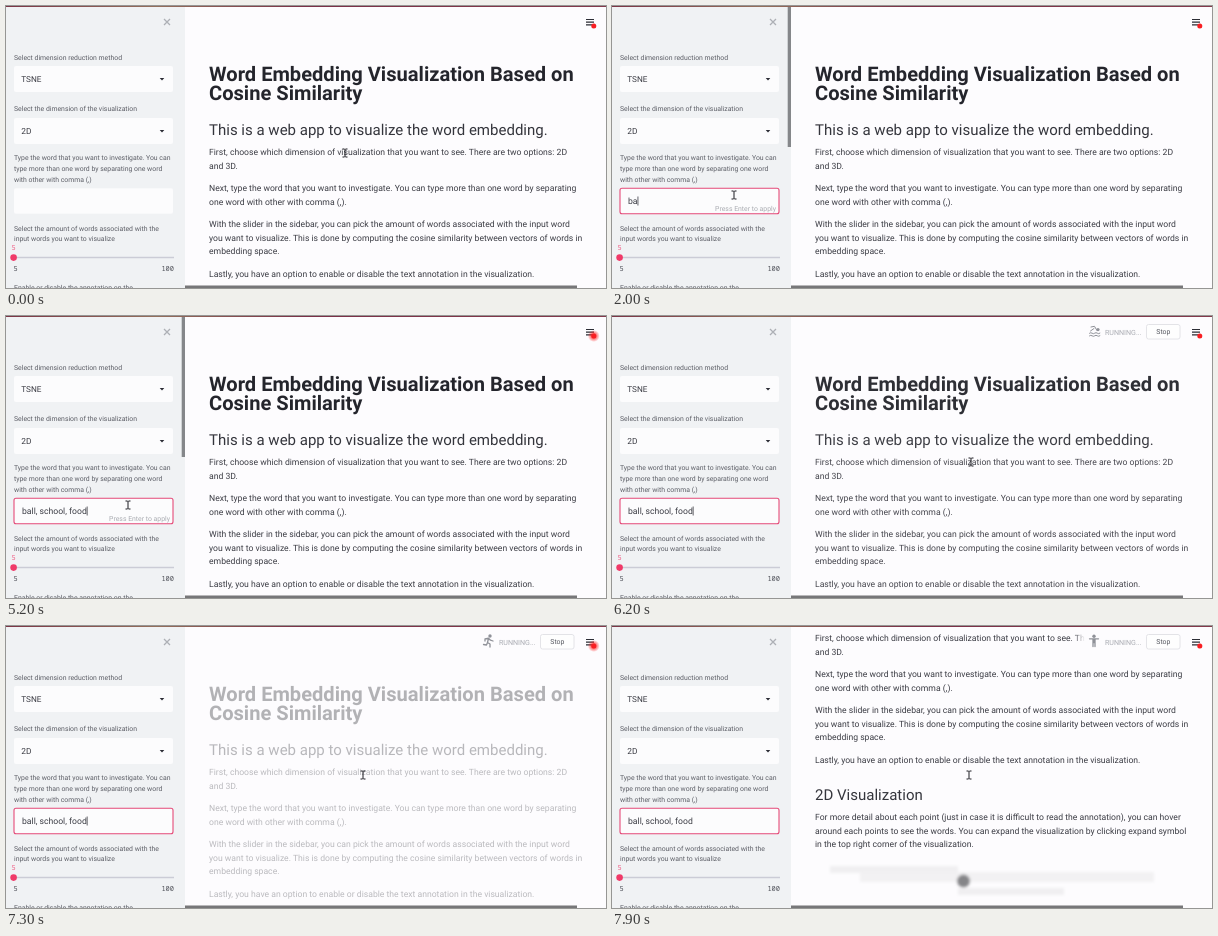
An HTML page that plays this animation: 600x282 px, repeating every 8 s.

```html
<!DOCTYPE html>
<html lang="en">
<head>
<meta charset="utf-8">
<title>Word embedding app</title>
<style>
  html, body { margin: 0; width: 100%; height: 100%; overflow: hidden; background: #fdfcfe; }
  svg { display: block; width: 600px; height: 282px; }
  text { font: 8.63px Roboto, sans-serif; fill: #3b3c44; white-space: pre; text-rendering: geometricPrecision; }
  .h1 { font-size: 20.1px; font-weight: 700; fill: #24252c; }
  .h2 { font-size: 15.02px; fill: #34353c; }
  .label { font-size: 6.87px; fill: #5c5e66; }
  .mono { font: 7px "Noto Sans Mono", monospace; fill: #4c4e56; }
  .line { fill: none; stroke: #8f9198; stroke-width: 1.3; stroke-linecap: round; stroke-linejoin: round; }
  .line circle { fill: #8f9198; stroke: none; }
</style>
</head>
<body>
<svg viewBox="0 0 600 282">
  <defs>
    <linearGradient id="strip">
      <stop offset="0" stop-color="#7c3546"/>
      <stop offset=".25" stop-color="#94705c"/>
      <stop offset=".5" stop-color="#7b3047"/>
      <stop offset="1" stop-color="#843a4c"/>
    </linearGradient>
    <linearGradient id="veil">
      <stop offset="0" stop-color="#fdfcfe" stop-opacity="0"/>
      <stop offset=".08" stop-color="#fdfcfe"/>
    </linearGradient>
    <radialGradient id="glow">
      <stop offset=".3" stop-color="#ff2020" stop-opacity=".8"/>
      <stop offset="1" stop-color="#ff2020" stop-opacity="0"/>
    </radialGradient>
    <filter id="soft" x="-20%" y="-50%" width="140%" height="200%"><feGaussianBlur stdDeviation="1.6"/></filter>
  </defs>

  <rect width="600" height="282" fill="#fdfcfe"/>
  <g id="page">
    <g id="intro"></g>
    <g id="result">
      <g id="resultText"></g>
      <g filter="url(#soft)">
        <rect x="218" y="374" width="128" height="7" fill="#f0eff1"/>
        <rect x="248" y="380" width="294" height="10" fill="#f2f1f3"/>
        <rect x="346" y="396" width="106" height="7" fill="#f0eff1"/>
        <circle cx="351.5" cy="389" r="6.5" fill="#858588"/>
      </g>
    </g>
  </g>

  <g id="status">
    <rect x="462" y="2" width="138" height="28" fill="url(#veil)"/>
    <g class="line" id="icons">
      <g stroke-width="1"><circle cx="486" cy="13.6" r="1.6"/><path d="M479 11l3.500-.7 2.500 4.200M478.500 15l3.500-2.500M477.500 17.200q1.300-1 2.600 0t2.600 0 2.600 0 2.600 0M477.500 19.800q1.300-1 2.600 0t2.600 0 2.600 0 2.600 0"/></g>
      <g><path d="M480 17a2.300 2.300 0 1 0 .1 0M486 17a2.300 2.300 0 1 0 .1 0M483 19v-3l-2-2 3-3 2 2h2"/><circle cx="485.5" cy="9" r="1.6"/></g>
      <g><circle cx="484" cy="10" r="1.7"/><path d="M479 15v-2l3.500-.8 2 2 2.500.8M482.500 12.500l-1 4 2.500 1.500v3M481.500 16.500l-1 2.500-3-.5"/></g>
      <g><circle cx="482" cy="10.3" r="1.7"/><path d="M477.500 12.800h9M481 13v7.500M483 13v7.500M482 13v3.500"/></g>
    </g>
    <text x="493" y="18.7" style="font-size:7.1px;fill:#a9abb2">RUNNING...</text>
    <rect x="534.5" y="8.500" width="33.500" height="14.500" rx="2" fill="#fefefe" stroke="#dddee2" stroke-width=".8"/>
    <text x="544.3" y="18.2" style="font-size:6.9px;fill:#55575f">Stop</text>
  </g>
  <path d="M580 13.500h8M580 16.200h8M580 18.900h8" stroke="#2c2d35" stroke-width="1.200"/>
  <circle id="halo" cx="587.8" cy="20" fill="url(#glow)"/>
  <circle cx="587.8" cy="20" r="2.5" fill="#f81e22"/>

  <rect width="179" height="282" fill="#f0f2f4"/>
  <path d="M158 13l6 6M164 13l-6 6" stroke="#adb0b5" stroke-width="1.300"/>
  <g id="labels"></g>
  <g fill="#fcfcfd">
    <rect x="8" y="60" width="159" height="26" rx="2"/>
    <rect x="8" y="112" width="159" height="26" rx="2"/>
    <rect id="input" x="8" y="182.300" width="159" height="25.500" rx="2" stroke-width="1.100"/>
  </g>
  <path d="M153.700 72h4.600l-2.300 2.500zM153.700 124h4.600l-2.300 2.500z" fill="#2c2d35"/>
  <text x="15.3" y="76.2" style="font-size:8.2px">TSNE</text>
  <text x="15.3" y="128.2" style="font-size:8.4px">2D</text>
  <text id="typed" x="16" y="198.2"></text>
  <path id="caret" d="M0 190.500v9" stroke="#3b3c44" stroke-width=".8"/>
  <text id="hint" x="164" y="205.3" text-anchor="end" style="font-size:6.88px;fill:#a9abb1">Press Enter to apply</text>
  <path d="M8 251.600h160" stroke="#cbccd6" stroke-width="1.500"/>
  <circle cx="7.6" cy="251.600" r="3.300" fill="#f03a68"/>
  <text class="mono" x="5.4" y="244.400" style="fill:#ef6288">5</text>
  <text class="mono" x="7.500" y="264.800">5</text>
  <text class="mono" x="168" y="264.800" text-anchor="end">100</text>
  <rect id="sideBar" x="175.700" y="1" width="3.300" height="140" fill="#85878a"/>

  <rect x="179" y="279.500" width="392" height="2.500" fill="#777779"/>
  <rect width="600" height="1" fill="url(#strip)"/>
  <path id="mouse" d="M-2.500-4h2l.5.500.500-.500h2M0-3.500v7M-2.500 4h2l.5-.500.500.500h2" fill="none" stroke="#1b1b20" stroke-width="1"/>
</svg>
<script>
const $ = id => document.getElementById(id);
const LOOP = 8000;

function addLines(id, x, cls, rows) {
  for (const [y, line] of rows) {
    const el = document.createElementNS('http://www.w3.org/2000/svg', 'text');
    el.setAttribute('x', x);
    el.setAttribute('y', y);
    el.setAttribute('class', cls);
    el.textContent = line;
    $(id).append(el);
  }
}

addLines('intro', 203, 'h1', [
  [74.5, 'Word Embedding Visualization Based on'],
  [93.7, 'Cosine Similarity']]);
addLines('intro', 203, 'h2', [[129.2, 'This is a web app to visualize the word embedding.']]);
addLines('intro', 203, '', [
  [149.3, 'First, choose which dimension of visualization that you want to see. There are two options: 2D'],
  [163.1, 'and 3D.'],
  [185.2, 'Next, type the word that you want to investigate. You can type more than one word by separating'],
  [198.9, 'one word with other with comma (,).'],
  [221, 'With the slider in the sidebar, you can pick the amount of words associated with the input word'],
  [234.7, 'you want to visualize. This is done by computing the cosine similarity between vectors of words in'],
  [248.4, 'embedding space.'],
  [270.5, 'Lastly, you have an option to enable or disable the text annotation in the visualization.']]);
addLines('resultText', 203, 'h2', [[308.3, '2D Visualization']]);
addLines('resultText', 203, '', [
  [328, 'For more detail about each point (just in case it is difficult to read the annotation), you can hover'],
  [341.7, 'around each points to see the words. You can expand the visualization by clicking expand symbol'],
  [355.4, 'in the top right corner of the visualization.']]);
addLines('labels', 8, 'label', [
  [53.5, 'Select dimension reduction method'],
  [105.1, 'Select the dimension of the visualization'],
  [154.2, 'Type the word that you want to investigate. You can'],
  [165, 'type more than one word by separating one word'],
  [175.5, 'with other with comma (,)'],
  [224.6, 'Select the amount of words associated with the'],
  [235.3, 'input words you want to visualize'],
  [284.3, 'Enable or disable the annotation on the']]);

const PHRASE = 'ball, school, food';
const KEYS = [1750, 1950, 2200, 2450, 2750, 2950, 3050, 3200, 3300, 3420, 3560, 3750, 3950, 4200, 4450, 4650, 4850, 5080];
const FOCUS = 1200, ENTER = 5600, RUN = 5800, RERUN = 7350;
// time, x, y
const MOVES = [[0, 339, 147], [150, 339, 147], [1000, 122, 189], [5650, 122, 189], [6150, 359, 146], [6500, 359, 146], [7000, 357, 149], [LOOP, 357, 149]];

const ramp = (t, a, b) => Math.min(1, Math.max(0, (t - a) / (b - a)));
const ease = k => k * k * (3 - 2 * k);
const show = (el, on) => { el.style.display = on ? '' : 'none'; };

function mouseAt(t) {
  const i = MOVES.findIndex(m => m[0] > t);
  const [t0, x0, y0] = MOVES[i - 1], [t1, x1, y1] = MOVES[i];
  const k = ease(ramp(t, t0, t1));
  return [x0 + (x1 - x0) * k, y0 + (y1 - y0) * k];
}

function draw(t) {
  const [mx, my] = mouseAt(t);
  $('mouse').setAttribute('transform', `translate(${mx} ${my})`);
  show($('sideBar'), mx < 179);

  const count = KEYS.filter(k => k <= t).length;
  const lastEdit = count ? KEYS[count - 1] : FOCUS;
  const focused = t >= FOCUS;
  $('typed').textContent = PHRASE.slice(0, count);
  $('input').setAttribute('stroke', focused ? '#e54a78' : 'none');
  show($('hint'), count && t < ENTER);
  show($('caret'), focused && (t - lastEdit) % 1000 < 500);
  $('caret').setAttribute('transform', `translate(${16.4 + (count ? $('typed').getComputedTextLength() : 0)})`);

  show($('status'), t >= RUN);
  const pose = Math.min(3, Math.floor((t - RUN) / 580));
  [...$('icons').children].forEach((icon, i) => show(icon, i === pose));

  const stale = ramp(t, 6130, 7130) * (1 - ramp(t, RERUN, RERUN + 150));
  $('intro').setAttribute('opacity', 1 - 0.66 * stale);
  show($('result'), t >= RERUN);
  const scroll = 134 * ease(ramp(t, 7450, 7850));
  $('page').setAttribute('transform', `translate(0 ${-scroll})`);

  const pulse = (1 + Math.cos((t - 1250) / 1000 * Math.PI)) / 2;
  $('halo').setAttribute('r', 2.5 + 3.5 * pulse);
  $('halo').setAttribute('opacity', pulse);
}

const start = performance.now();
function tick() {
  draw((performance.now() - start) % LOOP);
  requestAnimationFrame(tick);
}
tick();
</script>
</body>
</html>
```
